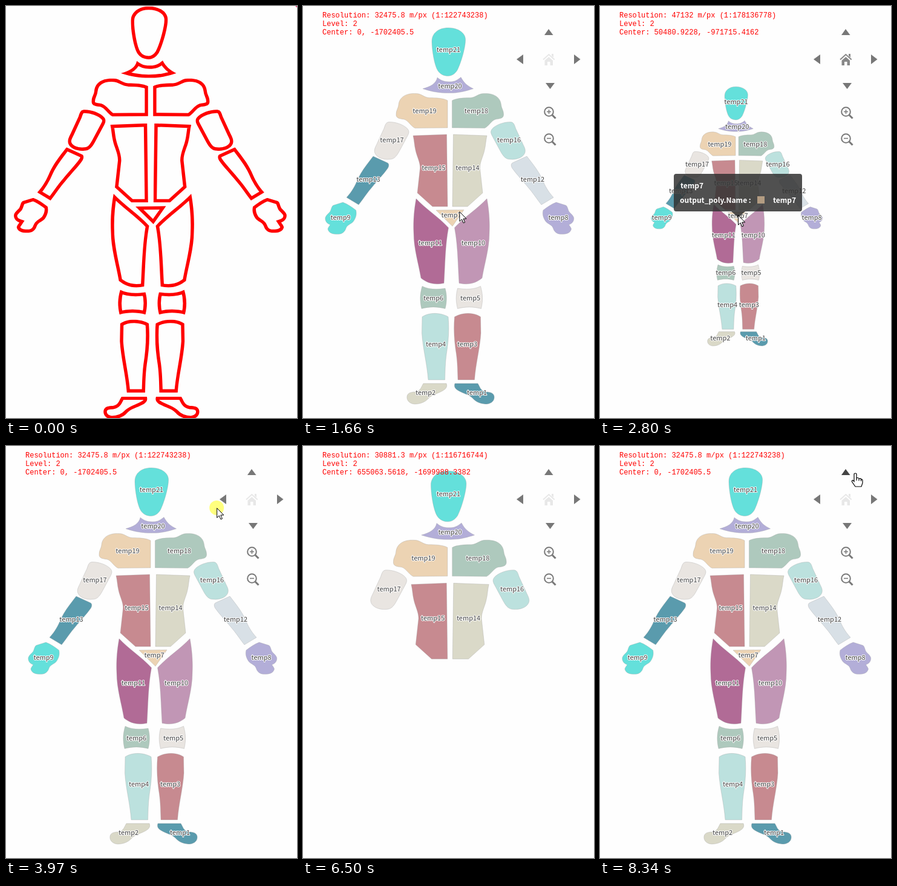
Recreate the animation shown at these times as an HTML page. Size 481 by 680 pixels, loop 8420 ms.

```html
<!DOCTYPE html>
<html lang="en">
<head>
<meta charset="utf-8">
<title>Body map</title>
<style>
html, body { margin: 0; width: 100%; height: 100%; overflow: hidden; background: #fefefe; }
svg { display: block; width: 481px; height: 680px; }
text { white-space: pre; }
.info { font: 12px "Liberation Mono", "Courier New", monospace; fill: #f00; }
.label { font: 500 11px "Noto Sans CJK JP", "Noto Sans CJK SC", "Noto Sans", sans-serif; text-anchor: middle;
  fill: #444; stroke: #fff; stroke-width: 2px; stroke-linejoin: round; paint-order: stroke; }
.tip { font: bold 12px "Noto Sans CJK JP", "Noto Sans CJK SC", "Noto Sans", sans-serif; fill: #fff; }
</style>
</head>
<body>
<svg id="stage" viewBox="0 0 481 680">
  <defs id="clips"></defs>
  <rect width="481" height="680" fill="#fefefe"/>
  <g id="shapes" stroke="#999" stroke-opacity=".45" stroke-width=".7"></g>
  <g id="labels"></g>
  <g fill="#777">
    <path id="up" d="M399 48L406 38L413.5 48Z"/>
    <path d="M401 127H416L408.5 137Z"/>
    <path d="M353 88L364 80V96Z"/>
    <path d="M458.500 88L448 80V96Z"/>
    <g id="home">
      <path d="M397 88.500L406.300 80L415.700 88.500" fill="none" stroke="currentColor" stroke-width="2"/>
      <path d="M411 79H414V85L411 82ZM399.500 90L406.300 84L413 90V98H408.500V92H404V98H399.500Z" fill="currentColor"/>
    </g>
    <g id="zooms" fill="none" stroke="#777"></g>
  </g>
  <g class="info">
    <text id="res" x="32" y="19"></text>
    <text id="level" x="32" y="33"></text>
    <text id="center" x="32" y="47"></text>
  </g>
  <g id="lasso" fill="none" stroke="#666" stroke-width="2" stroke-linejoin="round">
    <path id="trail" d="M297 65L272 66L240 68L211 69L178 83L157 103L141 125L121 165L116 184L109 205L108 233L113 240L122 241L150 236L168 236L200 243L216 251H282L291 246L299 236L315 231L334 227"/>
    <path id="closing" d="M334 227L352 205L359 180L349 128L325 95L301 70"/>
    <circle cx="297" cy="65" r="9" fill="#0b0" stroke="none"/>
  </g>
  <g id="tip">
    <path d="M126 277H330Q334 277 334 281V335Q334 339 330 339H240L228.500 349L217 339H126Q122 339 122 335V281Q122 277 126 277Z" fill="#323232" fill-opacity=".85"/>
    <rect x="260" y="314" width="12" height="12" fill="#b39c82"/>
    <g class="tip">
      <text x="133" y="301">temp7</text>
      <text x="132" y="325">output_poly.Name :</text>
      <text x="286" y="325">temp7</text>
    </g>
  </g>
  <g id="pointer">
    <circle id="press" r="12" fill="#ffff70" fill-opacity=".9"/>
    <path id="arrow" d="M.5 .5V16.300L4.200 12.900L6.800 19L9.300 18L6.700 12H11.700Z" fill="#fff" stroke="#000"/>
    <path id="hand" d="M-2 2Q-2 0 0 0Q2 0 2 2V8Q5 6.500 6 9Q9 7.800 9.500 10Q12 9.500 12 12V16L10 22H0L-5.500 14Q-6 11.500 -4 11.500L-2 13.500ZM2 8V12M6 9V12.500M9.500 10V13" fill="#fff" stroke="#000" stroke-width="1.200"/>
  </g>
  <g id="outline">
    <rect width="481" height="680" fill="#fefefe"/>
    <path d="M478 0H481V2.500Z" fill="#e0407a"/>
    <g id="lines" transform="translate(-27.300 -38.800) scale(1.097)" fill="none" stroke="#f00" stroke-width="10"></g>
  </g>
</svg>
<script>
const $ = id => document.getElementById(id);
const LOOP = 8420;
const HOME = { res: 32475.8146, x: -1702405.5 };
const MID = { x: 240.5, y: 345 };
const COLORS = ["#5a9bad", "#dad9c8", "#c78a90", "#bce1de", "#e9e5e1", "#aec9bd",
  "#ecd3b3", "#b3aed8", "#64e0db", "#c196b5", "#b16b96", "#d8e0e6"];

const parts = [];
function part(n, x, y, d, mirror) {
  parts.push({ n, x, y, d, mirror });
}
// Adds a left part and its reflection; sum is twice the mirror axis.
function pair(left, right, sum, lx, rx, y, d) {
  part(left, lx, y, d);
  part(right, rx, y, d, sum);
}

part(21, 240.5, 72, "M240 36C256 36 268 44 268.500 55C269 66 262 92 255 106C251 112 246 115.500 240 115.500C233 115.500 227 113 223 107C217 98 213 72 213 58C213 45 224 36 240 36Z");
part(20, 243, 132, "M222 118C220 128 211 133 198 136.500C215 142 226 143.500 240 143.500C256 143.500 264 142 281.500 136.500C272 132 266 127 261 117.500C253 124 249 125 241 125C232 125 227 122 222 118Z");
part(7, 245, 345, "M220 337L266 336.500L247 363.500Z");
pair(19, 18, 485.5, 201, 286.5, 173, "M239 156C232 152 219 151.500 209 151.500C200 151 196 144.500 187 144.500C168 143.500 159 152 158 163C157.500 169 154 172 154 178C153 186 161 186 167 187C174 189 178 198 185 201.500L239 201Z");
pair(17, 16, 485.5, 147, 340.5, 221, "M142 191.500C153 191 167 196 173 203C176 207 175 210 173 214L159 240C154 249 150 253 143 253C132 254 122 250 119 243C117 238 119 234 122 228L134 202C136 196 137 192 142 191.500Z");
pair(15, 14, 486, 216, 272, 267, "M182 214L237.500 212L239 331H214L189 308.500L193.500 268C194 258 188 248 186 238C184 230 184 222 182 214Z");
pair(13, 12, 486, 108, 379.5, 286, "M116 248L139 258.500C143 260 142 265 140 268C133 278 122 289 115 298C106 308 100 318 92 328L72 316C81 306 86 297 91 285C97 272 106 261 116 248Z");
pair(11, 10, 491, 210.5, 281.5, 391, "M187 318C203 335 224 348 240.500 366C235 395 235 425 233 457.500C216 461 205 457 195 449C191 425 183 400 183 375C182 352 184 335 187 318Z");
pair(9, 8, 484.5, 62, 422, 349, "M50 329L66 324C74 327 81 332 87.500 337C89 343 88 349 83 356C78 361 73 361 71 367C68 376 61 377 54 376.500C46 376 42 373 41 368C42 365 43 364 45 361C39 359 36 354 37 349C39 344 43 342 45 339C47 335 47 331 50 329Z");
pair(6, 5, 490.5, 215.5, 276.5, 482, "M197 462.500C208 468 221 468 235 466C238 477 238 488 235 499.500C222 496 209 496 196 499.500C193 487 193 476 197 462.500Z");
pair(4, 3, 490.5, 219.5, 271.5, 558, "M197 513C209 505 228 506 240 513C242 537 240 556 237 575C235 590 235 602 234.500 617H207C205 590 198 565 196.500 540Z");
pair(2, 1, 488, 202.5, 287.5, 638, "M199 623H237C239 629 236 632 231 635C222 640 214 641 208 647C201 655 192 657 184 657C175 656 171 650 172 644C173 638 180 637 186 637C195 635 195 629 199 623Z");
parts.sort((a, b) => a.n - b.n);

function add(parent, tag, attrs, text) {
  const el = document.createElementNS("http://www.w3.org/2000/svg", tag);
  for (const key in attrs) el.setAttribute(key, attrs[key]);
  if (text) el.textContent = text;
  return parent.appendChild(el);
}

for (const p of parts) {
  const flip = p.mirror ? `translate(${p.mirror} 0) scale(-1 1)` : "translate(0 0)";
  const clip = add($("clips"), "clipPath", { id: "clip" + p.n });
  add(clip, "path", { d: p.d });
  add($("lines"), "path", { d: p.d, transform: flip, "clip-path": `url(#clip${p.n})` });
  p.shape = add($("shapes"), "path", {
    d: p.d, transform: flip, fill: COLORS[(p.n - 1) % 12], "vector-effect": "non-scaling-stroke"
  });
  p.label = add($("labels"), "text", { class: "label" }, "temp" + p.n);
}
for (const [y, sign] of [[174.5, "M403 174.500H410M406.500 171V178"], [218.5, "M403 218.500H410"]]) {
  add($("zooms"), "circle", { cx: 406.5, cy: y, r: 7.3, "stroke-width": 2 });
  add($("zooms"), "path", { d: `M412 ${y + 5.5}L417.500 ${y + 11}`, "stroke-width": 3 });
  add($("zooms"), "path", { d: sign, "stroke-width": 1.5 });
}

// Rows: time, resolution, centre down, centre across.
const VIEW = [
  [1750, HOME.res, 0, HOME.x],
  [1970, 52345.007, 198.3361, -1165937.2846],
  [2040, 66685.21, 198.3361, -830214.1182],
  [2120, 66685.21, 198.3361, -830214.1182],
  [2280, 70600.34, 198.3361, -740308.6317],
  [2560, 70600.34, 198.3361, -740308.6317],
  [2800, 47132.022, 50480.9228, -971715.4162],
  [2980, 47132.022, 50480.9228, -971715.4162],
  [3240, HOME.res, 0, HOME.x],
  [6480, HOME.res, 0, HOME.x],
  [6650, 19567.879, 5302895.5, -1682838],
  [7800, 19567.879, 5302895.5, -1682838],
  [8180, HOME.res, 0, HOME.x]
];
// Rows: time, x, y.
const POINTER = [
  [1270, 440, 300], [1750, 217, 348], [2120, 217, 348], [2280, 222, 346], [2560, 222, 346],
  [2800, 228, 345], [2920, 228, 345], [3220, 408, 88], [3420, 408, 88], [3800, 370, 114],
  [4200, 319, 86], [4280, 297, 65], [5190, 334, 227], [5330, 358, 180], [5500, 349, 128],
  [5900, 302, 70], [5960, 302, 70], [6040, 301, 77], [6280, 301, 77], [6340, 300, 79],
  [6880, 300, 79], [6960, 466, 124], [7190, 317, 175], [7360, 317, 175], [7430, 322.5, 178],
  [7750, 405, 88], [7900, 405, 88], [8180, 418, 62], [8340, 422, 45]
];

function track(rows, t) {
  const i = rows.findIndex(r => r[0] > t);
  if (i === 0) return rows[0].slice(1);
  if (i < 0) return rows[rows.length - 1].slice(1);
  const a = rows[i - 1], b = rows[i], k = (t - a[0]) / (b[0] - a[0]);
  return a.slice(1).map((v, j) => v + (b[j + 1] - v) * k);
}
const within = (t, a, b) => t >= a && t < b;
const ramp = (t, a, b) => Math.min(1, Math.max(0, (t - a) / (b - a)));
const show = (el, on) => el.setAttribute("display", on ? "inline" : "none");
const round = (v, digits) => String(+v.toFixed(digits));

const trailSize = $("trail").getTotalLength();
const closingSize = $("closing").getTotalLength();
function reveal(el, size, k) {
  show(el, k > 0);
  el.setAttribute("stroke-dasharray", `${size * k} ${size + 9}`);
}

function drawMap(t) {
  const [res, cy, cx] = track(VIEW, t);
  const s = HOME.res / res;
  const dx = MID.x - cx / res - (MID.x - HOME.x / HOME.res) * s;
  const dy = MID.y - MID.y * s + cy / res;
  $("shapes").setAttribute("transform", `translate(${dx} ${dy}) scale(${s})`);
  const filtered = within(t, 6500, 7600);
  const selected = within(t, 5880, 6500);
  for (const p of parts) {
    const on = !filtered || p.n >= 14;
    show(p.shape, on);
    show(p.label, on);
    p.shape.setAttribute("stroke-width", selected && p.n >= 14 ? 1.6 : 0.7);
    p.label.setAttribute("x", p.x * s + dx);
    p.label.setAttribute("y", p.y * s + dy + 4);
  }
  $("res").textContent = `Resolution: ${round(res, 1)} m/px (1:${Math.round(res * 3779.5276)})`;
  $("level").textContent = "Level: " + (res < 25000 ? 3 : 2);
  $("center").textContent = `Center: ${round(cy, 4)}, ${round(cx, 4)}`;
}

function drawPointer(t) {
  let [x, y] = track(POINTER, t);
  const k = ramp(t, 4280, 5190);
  if (within(t, 4280, 5190)) ({ x, y } = $("trail").getPointAtLength(trailSize * k));
  $("pointer").setAttribute("transform", `translate(${x} ${y})`);
  show($("pointer"), t >= 1270 && !within(t, 6500, 6960));
  show($("press"), within(t, 3600, 5960));
  const hand = within(t, 3200, 3480) || t >= 7700;
  show($("hand"), hand);
  show($("arrow"), !hand);
  show($("lasso"), within(t, 4280, 5880));
  reveal($("trail"), trailSize, k);
  reveal($("closing"), closingSize, ramp(t, 5560, 5820));
}

function draw(t) {
  drawMap(t);
  drawPointer(t);
  show($("tip"), within(t, 2640, 2920));
  $("home").setAttribute("color", within(t, 1800, 3420) ? "#888" : "#e8e8e8");
  $("up").setAttribute("fill", t >= 8260 ? "#444" : "#777");
  const fade = t < 500 ? 0 : Math.min(1, Math.floor((t - 430) / 70) / 4);
  show($("outline"), fade < 1);
  $("outline").setAttribute("opacity", 1 - fade);
}

function tick() {
  draw(performance.now() % LOOP);
  requestAnimationFrame(tick);
}
tick();
</script>
</body>
</html>
```
